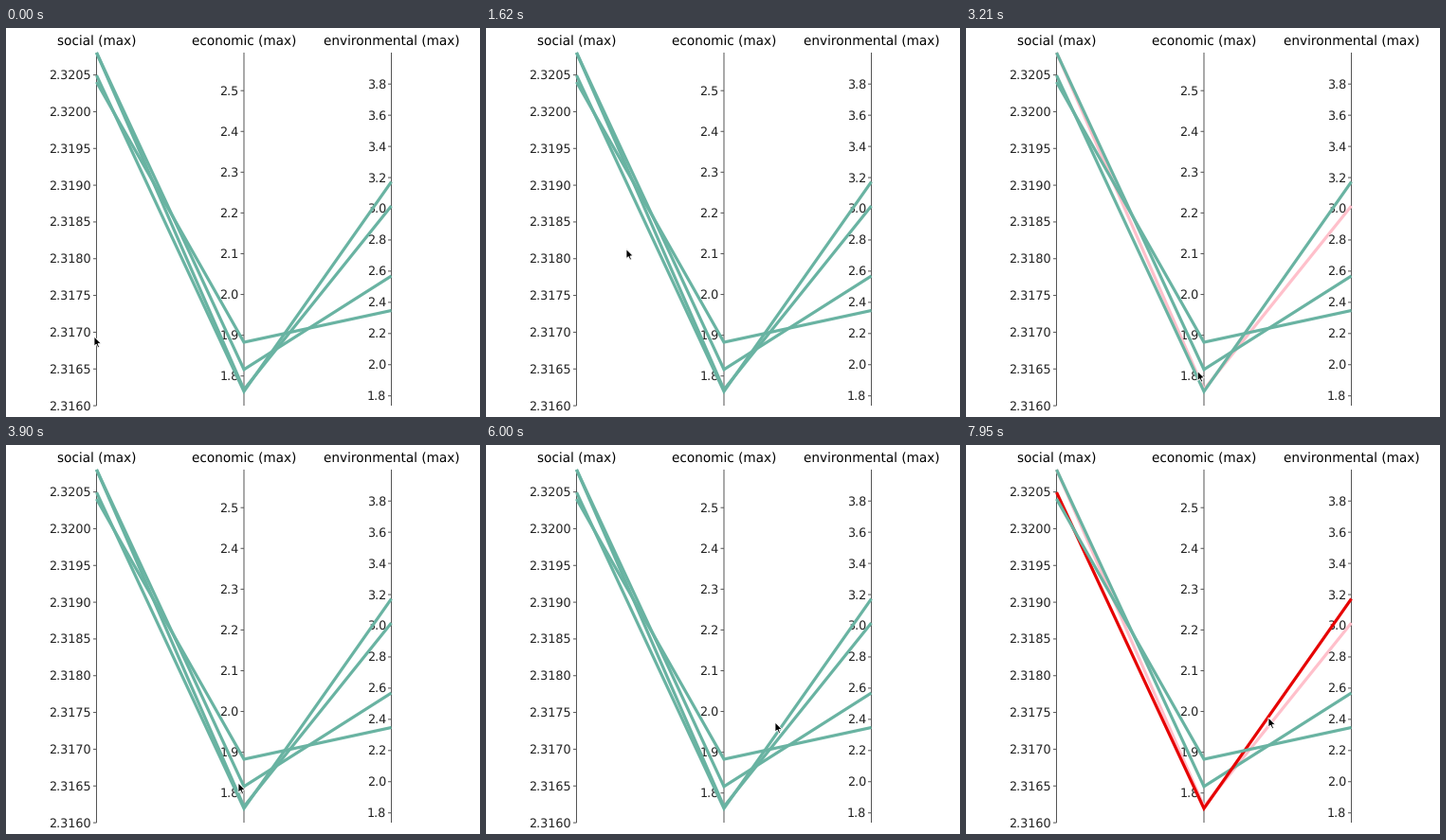
Recreate the animation shown at these times as a matplotlib script. Size 500 px wide and 411 px high, loop 8000 ms.

```python
import numpy as np
import matplotlib.pyplot as plt
from matplotlib.animation import FuncAnimation

W, H, DPI = 500, 411, 64
LOOP, STEP = 8000, 40
PX = 72 / DPI  # points per pixel

TEAL, PINK, RED = "#69b3a2", "#ffc0cb", "#e60000"
AXIS_X = 95.5 + 155.5 * np.arange(3)
TOP, BOTTOM = 26, 399
REACH = 2.2  # how close the pointer must be to highlight a line

plt.rcParams.update({"font.family": "DejaVu Sans", "text.hinting": "none"})
fig = plt.figure(figsize=(W / DPI, H / DPI), dpi=DPI, facecolor="white")
ax = fig.add_axes([0, 0, 1, 1])
ax.set_xlim(0, W)
ax.set_ylim(H, 0)
ax.axis("off")


def stroke(xs, ys, color, width, z):
    return ax.plot(xs, ys, color=color, lw=width * PX, zorder=z, snap=False,
                   solid_capstyle="butt", solid_joinstyle="miter")[0]


def draw_axis(x, title, first, step, count, y0, dy, fmt):
    stroke([x, x], [TOP, BOTTOM], "#555555", 1, 1)
    ax.text(x, 18.5, title, ha="center", size=13.65 * PX, color="black")
    for i in range(count):
        y = y0 + i * dy
        stroke([x - 3.5, x], [y, y], "#555555", 1, 1)
        ax.text(x - 5.5, y + 4.3, fmt % (first - i * step), ha="right",
                size=12.7 * PX, color="#222222", zorder=1)


draw_axis(AXIS_X[0], "social (max)", 2.3205, 0.0005, 10, 49.6, 38.83, "%.4f")
draw_axis(AXIS_X[1], "economic (max)", 2.5, 0.1, 8, 66.2, 43.07, "%.1f")
draw_axis(AXIS_X[2], "environmental (max)", 3.8, 0.2, 11, 59.2, 32.95, "%.1f")

# height of each solution on the three axes, bottom line first
SOLUTIONS = {
    "A": (26, 382, 188),
    "B": (26, 360.8, 262),
    "D": (50, 384, 162.5),
    "C": (57, 332, 298.5),
}
lines = {name: stroke(AXIS_X, ys, TEAL, 3.2, 2 + i / 10)
         for i, (name, ys) in enumerate(SOLUTIONS.items())}

# colours that stay once set: start ms, line, colour
CLICKS = [(6750, "D", RED), (7440, "A", PINK)]

# pointer moves: start ms, end ms, destination
START = (93, 326)
MOVES = [
    (0, 780, (176.5, 298)), (880, 1350, (148, 233.5)),
    (1750, 2070, (226, 375)), (2350, 2480, (234, 372)),
    (2570, 2900, (243.5, 365)), (3100, 3300, (245, 360)),
    (3520, 3660, (242, 362)), (3660, 3850, (245, 357)),
    (3940, 4380, (256, 320)), (4580, 4740, (262, 331.5)),
    (4880, 5140, (268, 350)), (5300, 5960, (305, 293)),
    (6180, 6300, (311, 298.5)), (7060, 7300, (316, 285)),
    (7400, 7860, (319, 288)),
]


def ease(u):
    u = np.clip(u, 0, 1)
    return u * u * (3 - 2 * u)


def pointer_at(t):
    pos = np.array(START, float)
    for start, end, goal in MOVES:
        pos += (goal - pos) * ease((t - start) / (end - start))
    return pos


def line_under(pos):
    """Topmost solution within reach of the pointer, or None."""
    side = int(pos[0] > AXIS_X[1])
    for name, ys in reversed(SOLUTIONS.items()):
        slope = (ys[side + 1] - ys[side]) / (AXIS_X[1] - AXIS_X[0])
        dy = ys[side] + slope * (pos[0] - AXIS_X[side]) - pos[1]
        if abs(dy) / np.hypot(1, slope) < REACH:
            return name
    return None


def over_label(pos):
    """True on the lowest label of the middle axis."""
    return 227 < pos[0] < 245 and 362 < pos[1] < 374


ARROW = np.array([(0, 0), (0, 10.2), (2.3, 8.1), (3.9, 11.6), (5.5, 10.9),
                  (4.0, 7.5), (7.2, 7.2)])
arrow, = ax.fill(*ARROW.T, fc="black", ec="white", lw=0.8 * PX, zorder=5)

gap = (np.nan, np.nan)
IBEAM = np.array([(-2.5, -5.5), (2.5, -5.5), gap, (0, -5.5), (0, 5.5), gap,
                  (-2.5, 5.5), (2.5, 5.5)])
ibeam = stroke(*IBEAM.T, "#555555", 1, 5)


def update(frame):
    t = frame * STEP
    pos = pointer_at(t)
    hovered = line_under(pos)
    colors = {name: PINK if name == hovered else TEAL for name in lines}
    colors.update({name: color for start, name, color in CLICKS if t >= start})
    for name, line in lines.items():
        line.set_color(colors[name])
    reading = over_label(pos) and hovered is None
    arrow.set_visible(not reading)
    ibeam.set_visible(reading)
    arrow.set_xy(ARROW + pos)
    ibeam.set_data(*(IBEAM + pos).T)
    return [*lines.values(), arrow, ibeam]


anim = FuncAnimation(fig, update, frames=LOOP // STEP, interval=STEP,
                     repeat=True, repeat_delay=0, blit=False)
plt.show()
```
